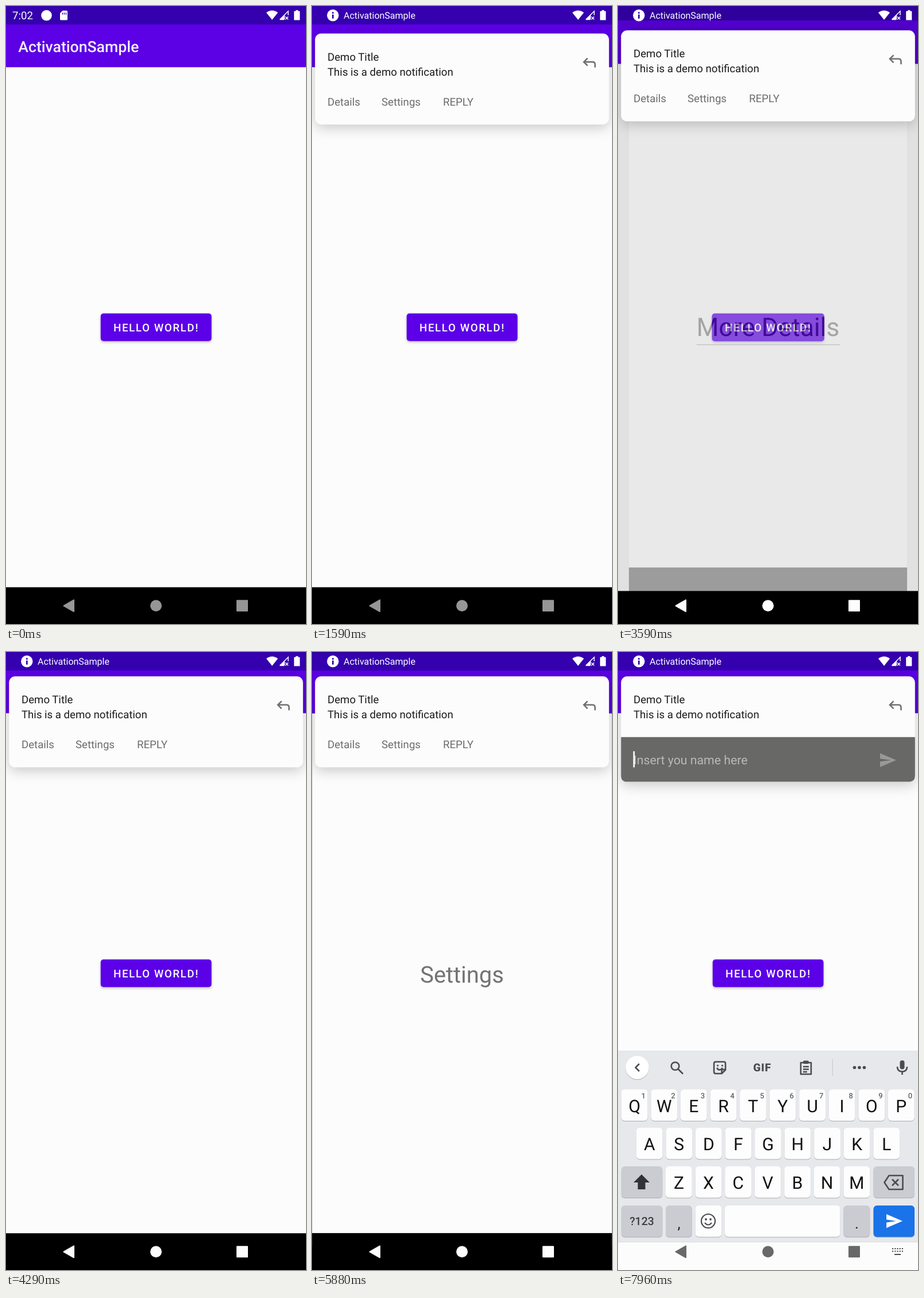
Write an HTML page that moves like this. It is 522 px wide and 1073 px high and loops after 8 s.

```html
<!DOCTYPE html>
<html lang="en">
<head>
<meta charset="utf-8">
<title>Notification</title>
<style>
html, body { margin: 0; width: 100%; height: 100%; overflow: hidden; background: #000; }
svg { display: block; font-family: Roboto, sans-serif; text-rendering: geometricPrecision; }
.mid { text-anchor: middle; }
.line { fill: none; stroke: #4a4c50; stroke-width: 2.6; stroke-linejoin: round; }
.key { filter: drop-shadow(0 1px 0 #a9abb0); }
#card { filter: drop-shadow(0 6px 11px rgba(0,0,0,.2)); }
</style>
</head>
<body>
<svg id="stage" width="522" height="1073" viewBox="0 0 522 1073"></svg>
<script>
const APP = 'ActivationSample';
const clamp = v => Math.max(0, Math.min(1, v));
const part = (t, start, length) => clamp((t - start) / length);
const mix = (a, b, p) => a + (b - a) * p;
const smooth = x => x * x * (3 - 2 * x);
const easeOut = x => 1 - (1 - x) ** 2;

const rect = (x, y, w, h, fill, rx = 0, more = '') =>
  `<rect x="${x}" y="${y}" width="${w}" height="${h}" rx="${rx}" fill="${fill}" ${more}/>`;
const circle = (x, y, r, fill, more = '') =>
  `<circle cx="${x}" cy="${y}" r="${r}" fill="${fill}" ${more}/>`;
const path = (d, fill, more = '') => `<path d="${d}" fill="${fill}" ${more}/>`;
const line = (d, more = '') => `<path d="${d}" class="line" ${more}/>`;
const text = (x, y, size, fill, str, more = '') =>
  `<text x="${x}" y="${y}" font-size="${size}" fill="${fill}" ${more}>${str}</text>`;
const MID = 'class="mid"';

function screen(id, content) {
  return `<g id="${id}">` + rect(0, 0, 522, 1073, '#000') +
    rect(0, 106, 522, 903.2, '#fcfcfd') + rect(0, 31, 522, 75.3, '#5c00e6') +
    rect(0, 0, 522, 32, '#3500ae') +
    text(21.3, 80, 26.6, '#f5effe', APP, 'font-weight="500"') + content + '</g>';
}

const button = rect(164.7, 533.7, 192.9, 48, '#5c00e8', 5, 'id="button"') +
  `<clipPath id="buttonClip">${rect(164.7, 533.7, 192.9, 48, '#000', 5)}</clipPath>` +
  `<g clip-path="url(#buttonClip)">${circle(0, 0, 0, '#fff', 'id="ripple"')}</g>` +
  text(187, 565, 18.61, '#fff', 'HELLO WORLD!', 'font-weight="500" letter-spacing="1.66"');

const details = text(261, 576, 47.85, '#1c1c1c', 'More Details', MID) +
  rect(127, 591.5, 269, 1.4, '#777');
const settings = text(261, 574, 39.9, '#737373', 'Settings', MID);

function keyboard() {
  const white = '#fdfdfd', gray = '#cbccd2', ink = '#4a4c50';
  const key = (x, y, w, fill = white) => rect(x, y, w, 54.5, fill, 6, 'class="key"');
  const row = (letters, x, y) => [...letters].map((c, i) => {
    const left = x + i * 51.57;
    return key(left, y, 45.8) + text(left + 22.9, y + 39, 30, '#111', c, MID) +
      (letters.length > 9 ? text(left + 38.5, y + 15, 13, '#5f6166', (i + 1) % 10, MID + ' font-weight="500"') : '');
  }).join('');
  const bar = circle(33.5, 721.5, 20.3, '#fff', 'class="key"') + line('M37 715l-6.5 6.5 6.5 6.5') +
    circle(99.5, 719, 6.8, 'none', 'class="line"') + line('M104.5 724l8.5 8.5') +
    line('M170 711.5h14q3 0 3 3v11l-6.5 6.5h-10.5q-3 0-3-3v-14.5q0-3 3-3zM172 722q4 7 10 0M187 725h-6.5v6.5') +
    circle(173.5, 718, 1.6, ink) + circle(181.5, 718, 1.6, ink) +
    text(251, 728, 19, ink, 'GIF', MID + ' font-weight="900" letter-spacing=".8"') +
    line('M318 713h18v20h-18zM322 720h10M322 724.5h10M322 729h7') + rect(322, 709.5, 10, 5.5, ink, 2) +
    rect(372.8, 707, 1, 29, '#c3c5c9') +
    [411.5, 420, 428.5].map(x => circle(x, 721.5, 2.8, ink)).join('') +
    rect(490.5, 709, 8, 15.5, ink, 4) + line('M486 720q0 8.5 8.5 8.5t8.5-8.5M494.5 728.5v5.5');
  return `<g id="keyboard">` + rect(0, 692, 522, 333, '#e6e8ec') + rect(0, 1024, 522, 49, '#fcfcfc') +
    rect(0, 1024, 522, 1, '#dcdde0') + bar +
    row('QWERTYUIOP', 5.8, 759.5) + row('ASDFGHJKL', 31.8, 826) + row('ZXCVBNM', 83, 893) +
    key(5.8, 893, 71.5, gray) + path('M41 907l14 14h-7.5v12h-13v-12h-7.5z', '#303236') +
    key(444.5, 893, 71.5, gray) + line('M471.5 909h24v24h-24l-8-12zM477 915.5l11 11M488 915.5l-11 11') +
    key(5.8, 961, 71.5, gray) + text(41.5, 995, 19.5, '#3c3e42', '?123', MID + ' font-weight="500"') +
    key(83, 961, 45.8, gray) + text(106, 1001, 26, '#222', ',', MID) +
    key(134.6, 961, 45.8) + circle(157, 988, 12, 'none', 'class="line" style="stroke-width:2.2"') +
    circle(153, 985, 1.9, ink) + circle(161, 985, 1.9, ink) + line('M151 991q6 7 12 0', 'style="stroke-width:2"') +
    key(186, 961, 200.5) + key(392.5, 961, 45.8, gray) + text(415.5, 1001, 26, '#222', '.', MID) +
    key(444.5, 961, 71.5, '#1a73e8') + path('M467 976l28 12-28 12v-9.5l17-2.5-17-2.5z', '#fff') +
    line('M477 1036h19M477 1040.5h19', 'style="stroke-width:2;stroke-dasharray:2.2 2"') +
    line('M481 1046h11', 'style="stroke-width:2"') + '</g>';
}

const nav = '<g id="nav" stroke-width="2" stroke-linejoin="round">' +
  '<path d="M100.5 1041.3L118 1031.3V1051.3Z"/><circle cx="261" cy="1041.2" r="9"/>' +
  '<rect x="402" y="1032.2" width="18" height="18"/></g>';

const action = (x, str) => text(x, 125.2, 18.61, '#6d6d6d', str);
const card = '<g id="headsUp">' + rect(5.3, 0, 511.5, 158, '#fcfcfc', 10.6, 'id="card"') +
  text(27, 47.1, 18.61, '#1b1b1b', 'Demo Title') +
  text(27, 73.1, 18.61, '#1b1b1b', 'This is a demo notification') +
  line('M479.5 43l-6.5 6.5 6.5 6.5M473 49.5H488q4.5 0 4.500 4.5V59', 'style="stroke:#707070;stroke-linejoin:miter"') +
  action(27, 'Details') + action(121, 'Settings') + action(228, 'REPLY') +
  `<clipPath id="replyClip">${circle(254, 120, 0, '#000', 'id="reveal"')}</clipPath>` +
  '<g clip-path="url(#replyClip)">' +
  path('M5.3 105.5H516.8V172.4q0 10.6-10.6 10.6H15.9q-10.6 0-10.6-10.6z', '#686867') +
  text(27, 152.5, 21.27, '#b9b9b8', 'Insert you name here') + rect(26.5, 130, 2.6, 28, '#fff') +
  path('M456 133.5l28 12-28 12v-9.5l19-2.5-19-2.5z', '#999') + '</g></g>';

const status = '<g id="clock">' + text(11, 23, 18.61, '#fff', '7:02') + circle(70.5, 16.3, 9.3, '#fff') +
  path('M98.5 8h7q1.5 0 1.5 1.5V23q0 1.5-1.5 1.5h-10q-1.5 0-1.5-1.5V12.5z', '#fff') +
  path('M98.5 11.5v3.5M101.5 11.5v3.5M104.5 11.5v3.5', 'none', 'stroke="#3500ae" stroke-width="1.3"') + '</g>' +
  '<g id="info">' + circle(36.3, 16.3, 10.2, '#fff') + rect(35, 14.8, 2.7, 7, '#3500ae') +
  rect(35, 10.5, 2.7, 2.7, '#3500ae') + text(55, 22, 16, '#fff', APP) + '</g>' +
  path('M463 24L453 11.5Q463 4 473 11.5Z', '#fff') +
  path('M476.5 23.5L491 9V16M476.5 23.5H484', 'none', 'stroke="#fff" stroke-width="1.5"') +
  path('M476.5 23.5L485 15V23.5Z', '#fff') +
  path('M486 18.5l5 5M491 18.5l-5 5', 'none', 'stroke="#fff" stroke-width="1.5"') +
  path('M504 9V7.3h4.5V9h2.8V24.5H501.2V9z', '#fff');

document.getElementById('stage').innerHTML =
  screen('home', button + rect(0, 0, 522, 1073, '#000', 0, 'id="dim"')) +
  screen('detailsPage', details) + screen('settingsPage', settings) +
  keyboard() + nav + card + status;

const $ = Object.fromEntries([...document.querySelectorAll('[id]')].map(e => [e.id, e]));
const set = (el, attrs) => { for (const k in attrs) el.setAttribute(k, attrs[k]); };
const show = (el, on) => { el.style.display = on ? '' : 'none'; };

// y at x on a cubic curve, found by halving
function curve(x, xs, ys) {
  const at = (p, u) => p[0] * (1 - u) ** 3 + 3 * p[1] * u * (1 - u) ** 2 + 3 * p[2] * u * u * (1 - u) + p[3] * u ** 3;
  let lo = 0, hi = 1;
  for (let i = 0; i < 24; i++) {
    const u = (lo + hi) / 2;
    if (at(xs, u) < x) lo = u; else hi = u;
  }
  return at(ys, lo);
}
const slowIn = x => x < 1 / 6
  ? curve(x, [0, .05, .1333, 1 / 6], [0, 0, .06, .4])
  : curve(x, [1 / 6, .2083, .25, 1], [.4, .82, 1, 1]);

// overshoots, dips, then settles
const bounce = x => x < .5 ? 1.125 * smooth(x * 2)
  : x < .8 ? mix(1.125, .975, smooth((x - .5) / .3))
  : mix(.975, 1, smooth((x - .8) / .2));

const scale = (el, s) => set(el, { transform: `translate(261 536) scale(${s}) translate(-261 -536)` });

const visits = [
  { page: $.detailsPage, open: 2290, close: 3500 },
  { page: $.settingsPage, open: 4690, close: 5870 }
];
const presses = [960, 6566];

function drawScreens(t) {
  let behind = 0;
  for (const { page, open, close } of visits) {
    const p = slowIn(part(t, open, 400)), q = slowIn(part(t, close, 400));
    const alpha = part(t, open + 35, 50) * (1 - part(t, close + 35, 80));
    behind += p - q;
    show(page, alpha > 0);
    set(page, { opacity: alpha });
    scale(page, t < close ? .85 + .15 * p : 1 - .1 * q);
  }
  scale($.home, 1 + .05 * behind);
  set($.dim, { opacity: .39 * behind });
}

function drawButton(t) {
  let lift = 0, alpha = 0;
  for (const start of presses) {
    const q = easeOut(part(t, start, 300));
    const on = part(t, start, 75) * (1 - part(t, start + 250, 230));
    lift = Math.max(lift, on);
    if (on > 0) {
      alpha = .22 * on;
      set($.ripple, { cx: mix(277, 261, q), cy: mix(534, 558, q), r: mix(30, 105, q) });
    }
  }
  set($.ripple, { opacity: alpha });
  $.button.style.filter = `drop-shadow(0 ${2 + 4 * lift}px ${2 + 2 * lift}px rgba(0,0,0,.25))`;
}

function drawHeadsUp(t) {
  const reply = smooth(part(t, 7600, 340));
  show($.headsUp, t >= 1215);
  set($.headsUp, { transform: `translate(0 ${mix(-170, 42.3, bounce(part(t, 1215, 550)))})` });
  set($.card, { height: mix(158, 183, reply) });
  set($.reveal, { r: 290 * reply });
  const named = part(t, 1230, 120);
  set($.clock, { opacity: 1 - named });
  set($.info, { opacity: named });
}

function drawKeyboard(t) {
  const p = easeOut(part(t, 7640, 290));
  show($.keyboard, p > 0);
  set($.keyboard, { transform: `translate(0 ${381 * (1 - p)})` });
  const shade = Math.round(mix(mix(150, 253, part(t, 3380, 80)), 104, p));
  const color = `rgb(${shade},${shade},${shade})`;
  set($.nav, { fill: color, stroke: color });
}

function frame() {
  const t = performance.now() % 8000;
  drawScreens(t);
  drawButton(t);
  drawHeadsUp(t);
  drawKeyboard(t);
  requestAnimationFrame(frame);
}
frame();
</script>
</body>
</html>
```
